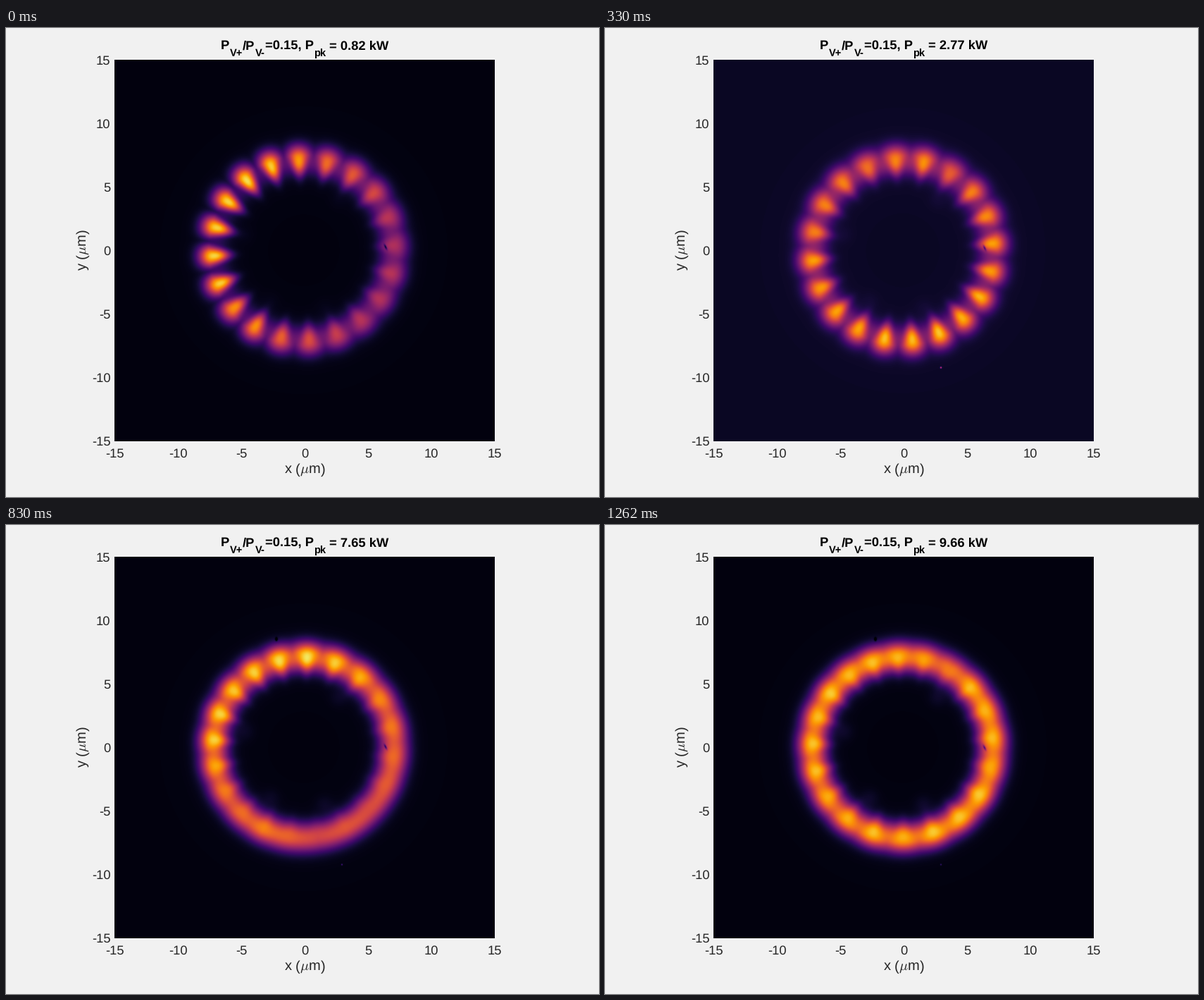
Recreate the animation shown at these times as a matplotlib script. Size 842x665 px, loop 1370 ms.

```python
import numpy as np
import matplotlib.pyplot as plt
from matplotlib.animation import FuncAnimation

W, H, DPI = 842, 665, 100
LEFT, TOP, WIDTH, HEIGHT = 154, 45, 540, 541
CX, CY, RING = 422.8, 315.2, 127.5
LOBES = 20
STEP = 10  # ms per animation frame
HOLDS = [170, 160, 170, 170, 160, 270, 270]

plt.rcParams.update({
    "font.family": "Liberation Sans",
    "mathtext.fontset": "cm",
    "text.hinting": "none",
})

# Peak power (kW), background, ring rotation (deg),
# then mean, swing and direction (deg) of the lobe brightness
STATES = [
    (0.82, .027, 3.3, .69, .24, 165),
    (1.36, .020, 3.6, .78, .18, 160),
    (2.77, .066, 5.4, .77, .08, -75),
    (4.46, .035, 8.5, .77, .15, -110),
    (5.62, .050, 11.3, .83, .08, 80),
    (7.65, .027, 12.5, .76, .15, 115),
    (9.66, .027, 19.7, .82, .03, -140),
]

X, Y = np.meshgrid(LEFT + np.arange(WIDTH) + .5, TOP + np.arange(HEIGHT) + .5)
THETA = np.degrees(np.arctan2(CY - Y, X - CX))
OFFSET = np.hypot(X - CX, Y - CY) - RING
PROFILE = np.exp(-np.abs(OFFSET / 21) ** 2.3)


def toward(direction):
    return np.cos(np.radians(THETA - direction))


def spot(x, y, sx, sy=None, slant=0):
    """Gaussian spot, sheared sideways by slant."""
    dx = X - x - slant * (Y - y)
    return np.exp(-(dx / sx) ** 2 / 2 - ((Y - y) / (sy or sx)) ** 2 / 2)


def ring_image(index):
    power, floor, turn, mean, swing, direction = STATES[index]
    rng = np.random.default_rng(index)

    # Rotation grows with power and is uneven around the ring
    uneven = .45 * power * toward(235 - 2.3 * power ** 2)
    pos = (THETA - turn - uneven) * LOBES / 360

    # Lobes narrow towards the centre of the ring
    sharpness = np.clip(1.1 - OFFSET / 25, .8, 2.2)
    lobe = (.5 + .5 * np.cos(2 * np.pi * pos)) ** sharpness

    jitter = rng.normal(0, .035, LOBES)
    level = mean + swing * toward(direction)
    level += np.interp(pos, np.arange(LOBES), jitter, period=LOBES)

    # Gaps fill up with power, first on the dim side
    fill = .42 + .42 / (1 + np.exp(-2 * (power - 4)))
    fill = np.clip(fill - 1.1 * swing * toward(direction), 0, 1)
    fill *= np.clip(1 + OFFSET / 160, .7, 1)
    img = floor + (level - floor) * PROFILE * (fill + (1 - fill) * lobe)

    img += .02 * np.exp(-(OFFSET / 38) ** 2) * (1 - PROFILE)
    for angle in (55, 165, 237, 290):
        a = np.radians(angle)
        img += (.01 + .003 * power) * spot(CX + 86 * np.cos(a),
                                           CY - 86 * np.sin(a), 9)

    # Dust and a hot pixel on the camera
    img -= .3 * spot(539, 310 + .6 * power, 1.1, 2.6, .4)
    if index >= 2:
        img += 1.4 / power * spot(477, 481.5, .8)
    if index >= 3:
        img -= .2 * spot(384, 162, 1.2, 1.8)
    return np.clip(img, 0, 1)


fig = plt.figure(figsize=(W / DPI, H / DPI), dpi=DPI, facecolor="#f1f1f1")
ax = fig.add_axes([0, 0, 1, 1])
ax.axis("off")


def label(x, y, text, px, **style):
    style = {"color": "#262626", "va": "baseline", **style}
    return ax.text(x, y, text, fontsize=px * 72 / DPI, **style)


def title(x, text, sub=False):
    return label(x, 39.5 if sub else 30.5, text, 14.67 if sub else 18.33,
                 weight="bold", color="black")


images = [ring_image(i) for i in range(len(STATES))]
picture = ax.imshow(images[0], cmap="inferno", vmin=0, vmax=1,
                    extent=(LEFT, LEFT + WIDTH, TOP + HEIGHT, TOP),
                    interpolation="nearest", aspect="auto")
ax.set_xlim(0, W)
ax.set_ylim(H, 0)

for value in range(-15, 16, 5):
    label(424 + 18 * value, 608.5, str(value), 18.33, ha="center")
    label(148.5, 322 - 18 * value, str(value), 18.33, ha="right")
label(424, 631.5, r"x ($\mu$m)", 20.17, ha="center")
label(114.5, 315, r"y ($\mu$m)", 20.17, ha="center",
      rotation=90, rotation_mode="anchor")

title(305.2, "P")
title(317.6, "V+", sub=True)
title(335.8, "/P")
title(353.8, "V-", sub=True)
title(368, "=0.15, P")
title(436.6, "pk", sub=True)
power_text = title(458.8, "")

ENDS = np.cumsum(HOLDS)


def update(frame):
    index = int(np.searchsorted(ENDS, frame * STEP, side="right"))
    picture.set_data(images[index])
    power_text.set_text(f"= {STATES[index][0]:.2f} kW")
    return picture, power_text


anim = FuncAnimation(fig, update, frames=sum(HOLDS) // STEP, interval=STEP,
                     repeat=True, repeat_delay=0)
plt.show()
```
